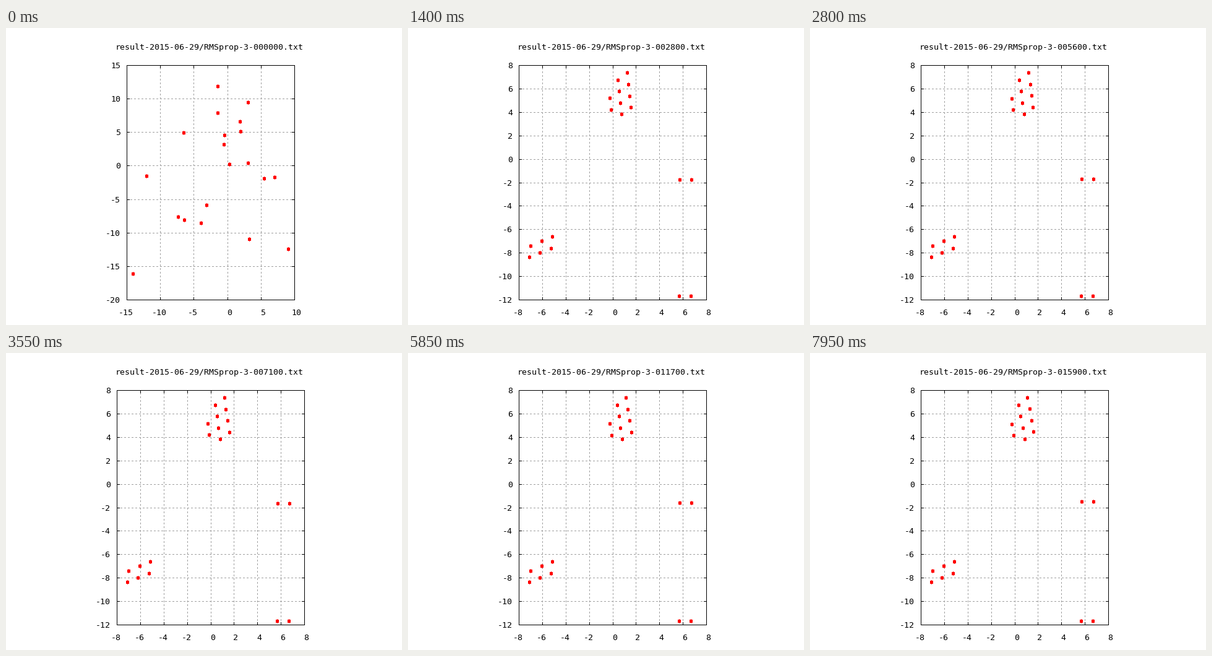
These frames come from a looping animation (640 px wide and 480 px high, 8000 ms). A matplotlib script:

```python
import math

import matplotlib.pyplot as plt
import numpy as np
from matplotlib.animation import FuncAnimation
from matplotlib.collections import LineCollection, PolyCollection

W, H, DPI = 640, 480, 80
PX = 72 / DPI                     # one pixel in points
FRAMES, INTERVAL = 160, 50
TOP, BOTTOM, MID_X = 60, 439, 330.5
CHAR = 8                          # width of one text cell in pixels
TICK = 5
SPEED = np.array([1.25, 0.8])     # units per frame along x and y
SETTLED = 14
GAP = 0.99                        # rest distance between neighbours


def polar(deg):
    a = math.radians(deg)
    return np.array([math.cos(a), -math.sin(a)])


def cells(*columns):
    """Column and row numbers, counted from their mean."""
    grid = np.array([(c, r) for c, rows in enumerate(columns) for r in rows])
    return grid - grid.mean(axis=0)


def patch(grid, center, tilt, gap=GAP):
    """Piece of a hexagonal lattice; rows run along tilt."""
    offsets = grid[:, :1] * polar(tilt - 120) + grid[:, 1:] * polar(tilt)
    return np.array(center) + gap * offsets


RING = cells(range(2), range(-1, 3), range(-1, 3))
SIX = cells(range(2), range(2), range(2))
PAIR = cells([0], [0])

# The scattered points, in the order of the cells they settle in
START = np.vstack([
    [(-6.51, 4.93), (-0.52, 3.18),
     (-1.44, 11.86), (-1.44, 7.89), (-0.42, 4.56), (0.31, 0.22),
     (3.08, 9.46), (1.88, 6.60), (1.97, 5.12), (3.08, 0.41)],
    [(-12.05, -1.53), (-14.08, -16.12), (-7.34, -7.63),
     (-6.42, -8.09), (-3.10, -5.87), (-3.93, -8.55)],
    patch(PAIR, (6.177, -11.68), 134.3, 6),
    patch(PAIR, (6.265, -1.81), 113.5, 1.58),
])


def points(n):
    """Each axis runs at its own speed to rest; then a slow turn and drift."""
    p = max(0, n - SETTLED) / (FRAMES - 1 - SETTLED)
    rest = np.vstack([
        patch(RING, (0.761, 5.40), 83.6 - 3.8 * p),
        patch(SIX, (-6.125, -7.497), 97),
        patch(PAIR, (6.178, -11.68), 120),
        patch(PAIR, (6.231, -1.773 + 0.256 * p), 120),
    ])
    return START + np.clip(rest - START, -SPEED * n, SPEED * n)


def tick_step(span):
    """Step of 1, 2 or 5 times a power of ten."""
    power = 10 ** math.floor(math.log10(span))
    share = span / power
    return power * (0.1 if share < 1 else 0.2 if share <= 2 else 0.5)


def axis_ticks(values):
    lo, hi = values.min(), values.max()
    step = tick_step(hi - lo)
    return np.arange(math.floor(lo / step), math.ceil(hi / step) + 1) * step


def to_pixels(values, ticks, a, b):
    share = (values - ticks[0]) / (ticks[-1] - ticks[0])
    return np.floor(a + share * (b - a) + 0.5)


fig = plt.figure(figsize=(W / DPI, H / DPI), dpi=DPI, facecolor="white")
ax = fig.add_axes([0, 0, 1, 1])
ax.set_xlim(0, W)
ax.set_ylim(H, 0)
ax.axis("off")
drawn = []


def label(x, y, text):
    drawn.append(ax.text(x, y, text, family="DejaVu Sans Mono",
                         size=13.29 * PX, color="black",
                         ha="left", va="baseline"))


def across(y, a, b):
    return [(a, y + 0.5), (b, y + 0.5)]


def down(x, a, b):
    return [(x + 0.5, a), (x + 0.5, b)]


def strokes(segments, color, style="solid"):
    lines = LineCollection(segments, colors=color, linewidths=PX,
                           linestyles=style, antialiaseds=False, snap=False)
    drawn.append(ax.add_collection(lines, autolim=False))


def box(x, y, rx, ry):
    """Rectangle of whole pixels around the pixel (x, y)."""
    l, r, t, b = x - rx, x + rx + 1, y - ry, y + ry + 1
    return [(l, t), (r, t), (r, b), (l, b)]


def dots(xs, ys):
    shapes = [box(x, y, rx, ry) for x, y in zip(xs, ys)
              for rx, ry in ((2, 2), (0, 3))]
    polys = PolyCollection(shapes, facecolors="red", edgecolors="none",
                           linewidths=0, antialiaseds=False, snap=False,
                           zorder=3)
    drawn.append(ax.add_collection(polys, autolim=False))


def draw(n):
    while drawn:
        drawn.pop().remove()

    px, py = points(n).T
    xt, yt = axis_ticks(px), axis_ticks(py)
    width = (BOTTOM - TOP) * np.ptp(xt) / np.ptp(yt)
    left, right = round(MID_X - width / 2), round(MID_X + width / 2)
    xs = to_pixels(xt, xt, left, right)
    ys = to_pixels(yt, yt, BOTTOM, TOP)

    strokes([down(x, BOTTOM, TOP) for x in xs[1:-1]]
            + [across(y, left, right) for y in ys[1:-1]],
            "#a0a0a0", (0, (2, 3)))

    black = [down(x, TOP, BOTTOM + 1) for x in (left, right)]
    black += [across(y, left, right + 1) for y in (TOP, BOTTOM)]
    for x in xs:
        black += [down(x, TOP, TOP + TICK),
                  down(x, BOTTOM + 1 - TICK, BOTTOM + 1)]
    for y in ys:
        black += [across(y, left, left + TICK),
                  across(y, right + 1 - TICK, right + 1)]
    strokes(black, "black")

    for x, v in zip(xs, xt):
        text = f"{v: g}"          # a blank stands in for the plus sign
        start = x - 1 - CHAR * len(text) / 2
        label(start + CHAR * text.startswith(" "), 464, text.strip())
    for y, v in zip(ys, yt):
        text = f"{v:g}"
        label(left - 10 - CHAR * len(text), y + 5, text)
    label(177, 35, f"result-2015-06-29/RMSprop-3-{n * 100:06d}.txt")

    dots(to_pixels(px, xt, left, right), to_pixels(py, yt, BOTTOM, TOP))
    return drawn


anim = FuncAnimation(fig, draw, frames=FRAMES, init_func=lambda: draw(0),
                     interval=INTERVAL, repeat=True, repeat_delay=0, blit=False)
plt.show()
```
